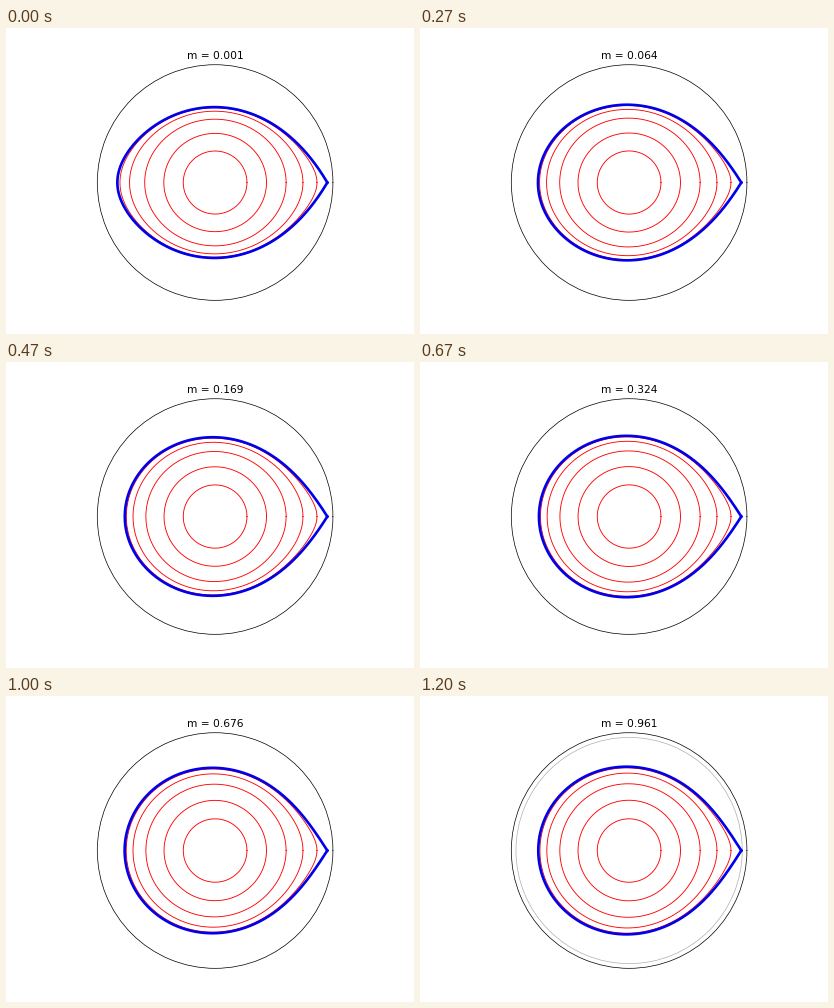
Recreate the animation shown at these times as a matplotlib script. Size 408 px wide and 306 px high, loop 1.27 s.

```python
"""Equipotential curves around the lighter body of a binary, for a growing mass ratio m."""
from functools import lru_cache

import matplotlib.pyplot as plt
import numpy as np
from matplotlib.animation import FuncAnimation

WIDTH, HEIGHT, DPI = 408, 306, 63.75
TICK_MS, LOOP_MS = 10, 1270
FILL = (0.284, 0.458, 0.633, 0.783, 0.908)  # inner levels, as parts of the lobe's length
THETA = np.linspace(0, 2 * np.pi, 721)


def potential(r, theta, m):
    dist = np.sqrt(1 - 2 * r * np.cos(theta) + r * r)
    return m / r + 1 / dist - r * np.cos(theta) + (1 + m) / 2 * r * r


def bisect(is_inside, low, high, steps=45):
    for _ in range(steps):
        mid = (low + high) / 2
        inside = is_inside(mid)
        low = np.where(inside, mid, low)
        high = np.where(inside, high, mid)
    return low


def saddle_distance(m):
    """Distance from the lighter body to the inner saddle point."""
    def pulled_back(r):
        return m / r**2 - 1 / (1 - r)**2 + 1 - (1 + m) * r > 0
    return float(bisect(pulled_back, 1e-4, 0.6))


def level_curve(r_axis, r_max, m):
    """Radius over THETA of the curve that crosses the axis at r_axis."""
    level = potential(r_axis, 0, m)
    low = np.full_like(THETA, 1e-6)
    high = np.full_like(THETA, r_max)
    return bisect(lambda r: potential(r, THETA, m) > level, low, high)


@lru_cache(maxsize=None)
def state(step):
    m = (step + 1)**2 / 1000
    tip = saddle_distance(m)
    curves = [level_curve(f * tip, tip, m) for f in FILL + (1,)]
    return m, tip, curves


fig = plt.figure(figsize=(WIDTH / DPI, HEIGHT / DPI), dpi=DPI, facecolor="white")
ax = fig.add_subplot(projection="polar")
ax.set_xticks([])
ax.set_yticks([0.5], labels=[""])
title = ax.set_title("", fontsize=12, family="DejaVu Sans", y=1.0, pad=6)
lines = [ax.plot([], [], color="red", lw=1)[0] for _ in FILL]
lines += ax.plot([], [], color="#0000ea", lw=3)


def update(i):
    # 15 pictures a second, each showing the next of 25 steps a second
    picture = (i * TICK_MS + 5) * 15 // 1000
    m, tip, curves = state((5 * picture + 2) // 3)
    for line, radius in zip(lines, curves):
        line.set_data(THETA, radius)
    ax.set_rlim(0, 1.05 * tip)
    title.set_text(f"m = {m:.3f}")
    return [*lines, title]


anim = FuncAnimation(fig, update, frames=LOOP_MS // TICK_MS, interval=TICK_MS,
                     init_func=lambda: update(0), repeat=True, repeat_delay=0)
plt.show()
```
